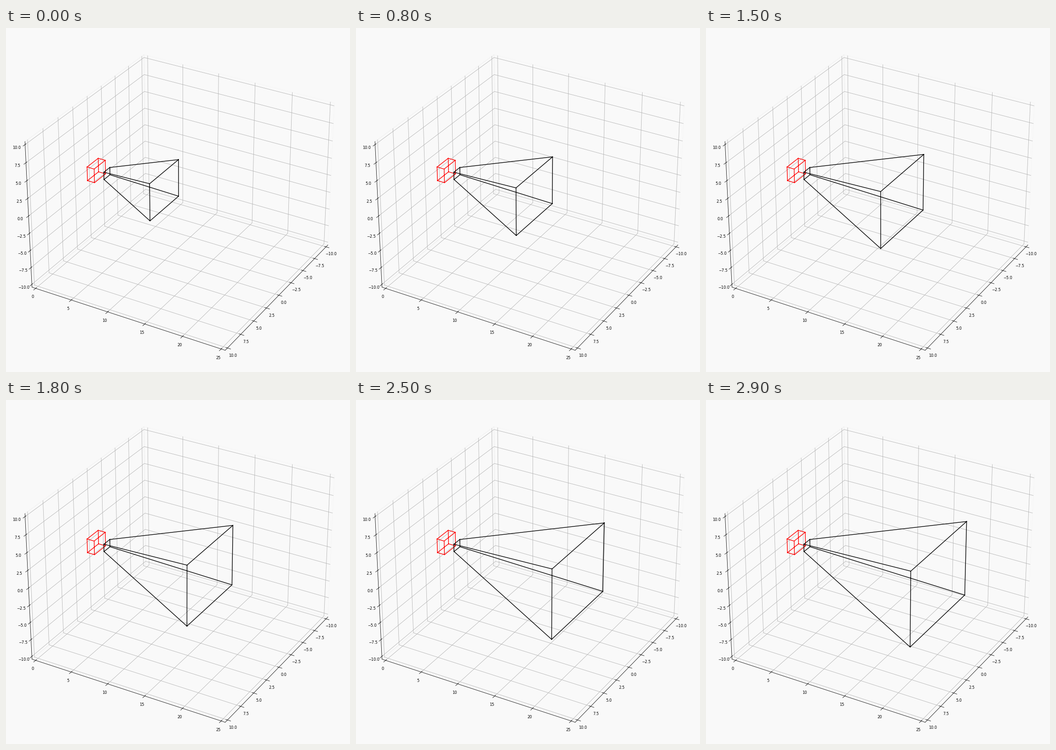
A matplotlib script for the animation above (3000 ms loop, 748 by 748 pixels).

```python
import itertools

import matplotlib.pyplot as plt
import numpy as np
from matplotlib.animation import FuncAnimation
from matplotlib.collections import LineCollection

SIZE, DPI, FRAMES = 748, 72, 30
LOW = np.array([-10.0, 0.0, -10.0])
HIGH = np.array([10.0, 25.0, 10.0])
SPAN = HIGH - LOW
BOX = np.array([4, 4, 3]) * 2 / 7        # drawn proportions of the three axes
DELTA = SPAN / 12
MIN, MAX = LOW - DELTA / 4, HIGH + DELTA / 4
DIST = 10
ELEV = AZIM = np.radians(30)

VIEW = np.array([np.cos(ELEV) * np.cos(AZIM), np.cos(ELEV) * np.sin(AZIM), np.sin(ELEV)])
RIGHT = np.array([-np.sin(AZIM), np.cos(AZIM), 0])
UP = np.cross(VIEW, RIGHT)


def project(points):
    p = ((np.asarray(points, float) - LOW) / SPAN - 0.5) * BOX
    depth = DIST - p @ VIEW
    return np.stack([p @ RIGHT / depth, p @ UP / depth], axis=-1)


def strokes(segments):
    """Projected segments as one x, y path with gaps between them."""
    flat = project(segments)
    gap = np.full((len(flat), 1, 2), np.nan)
    return np.concatenate([flat, gap], axis=1).reshape(-1, 2).T


def frustum(y0, half0, y1, half1):
    """The 12 edges of a box whose square ends lie at y0 and y1."""
    corners = [(-1, -1), (1, -1), (1, 1), (-1, 1)]
    near = [(a * half0, y0, b * half0) for a, b in corners]
    far = [(a * half1, y1, b * half1) for a, b in corners]
    edges = list(zip(near, far))
    for end in (near, far):
        edges += [(end[i], end[(i + 1) % 4]) for i in range(4)]
    return np.array(edges)


fig = plt.figure(figsize=(SIZE / DPI, SIZE / DPI), dpi=DPI, facecolor="#f9f9f9")
ax = fig.add_axes([0, 0, 1, 1])
ax.set_xlim(-0.95 / DIST, 0.9 / DIST)
ax.set_ylim(-0.95 / DIST, 0.9 / DIST)
ax.axis("off")


def draw_panes():
    for i, grey in enumerate((0.95, 0.9, 0.925)):
        a, b = [k for k in range(3) if k != i]
        ring = np.tile(MIN, (5, 1))
        ring[[1, 2], a] = MAX[a]
        ring[[2, 3], b] = MAX[b]
        ax.plot(*project(ring).T, color=(grey,) * 3, alpha=0.5, lw=0.9, zorder=1)


def draw_axis(i, edge, tick_dir, ticks, fmt):
    """Axis i along the given box edge, with grid, ticks and labels."""
    others = [k for k in range(3) if k != i]
    side = np.where(edge == MAX, 1, -1)

    ends = np.array([edge, edge])
    ends[:, i] = MIN[i], MAX[i]
    ax.plot(*project(ends).T, color="k", lw=0.8, zorder=3)

    grid, marks = [], []
    for value in ticks:
        bend = np.tile(MIN, (3, 1))
        bend[0, others[0]] = MAX[others[0]]
        bend[2, others[1]] = MAX[others[1]]
        bend[:, i] = value
        grid.append(project(bend))

        mark = np.array([edge, edge])
        mark[:, i] = value
        mark[:, tick_dir] += np.array([-0.1, 0.2]) * side[tick_dir] * DELTA[tick_dir]
        marks.append(mark)

        spot = edge.copy()
        spot[i] = value
        spot[others] += 0.33 * side[others] * DELTA[others]
        text = fmt.format(value).replace("-", "\u2212")
        ax.text(*project(spot), text, ha="center", va="top", fontsize=8.3,
                family="DejaVu Sans", color="k", zorder=5)

    ax.add_collection(LineCollection(grid, colors="#b0b0b0", linewidths=0.8, zorder=2),
                      autolim=False)
    ax.plot(*strokes(marks), color="k", lw=0.8, zorder=3)


draw_panes()
halves = np.arange(-10, 10.1, 2.5)
draw_axis(0, np.array([MIN[0], MAX[1], MIN[2]]), 1, halves, "{:.1f}")
draw_axis(1, np.array([MAX[0], MIN[1], MIN[2]]), 0, np.arange(0, 26, 5), "{:.0f}")
draw_axis(2, np.array([MAX[0], MIN[1], MIN[2]]), 0, halves, "{:.1f}")

ax.plot(*strokes(frustum(0, 1, 1, 1)), color="red", lw=1.4, zorder=6)
cone, = ax.plot([], [], color="k", lw=1.4, zorder=7)

SLOPE = np.tan(np.radians(15))
NEAR = 2


def update(frame):
    far = 10 + 10 * frame / (FRAMES - 1)
    cone.set_data(*strokes(frustum(NEAR, NEAR * SLOPE, far, far * SLOPE)))
    return cone,


anim = FuncAnimation(fig, update, frames=FRAMES, interval=100, repeat=True, repeat_delay=0)
plt.show()
```
